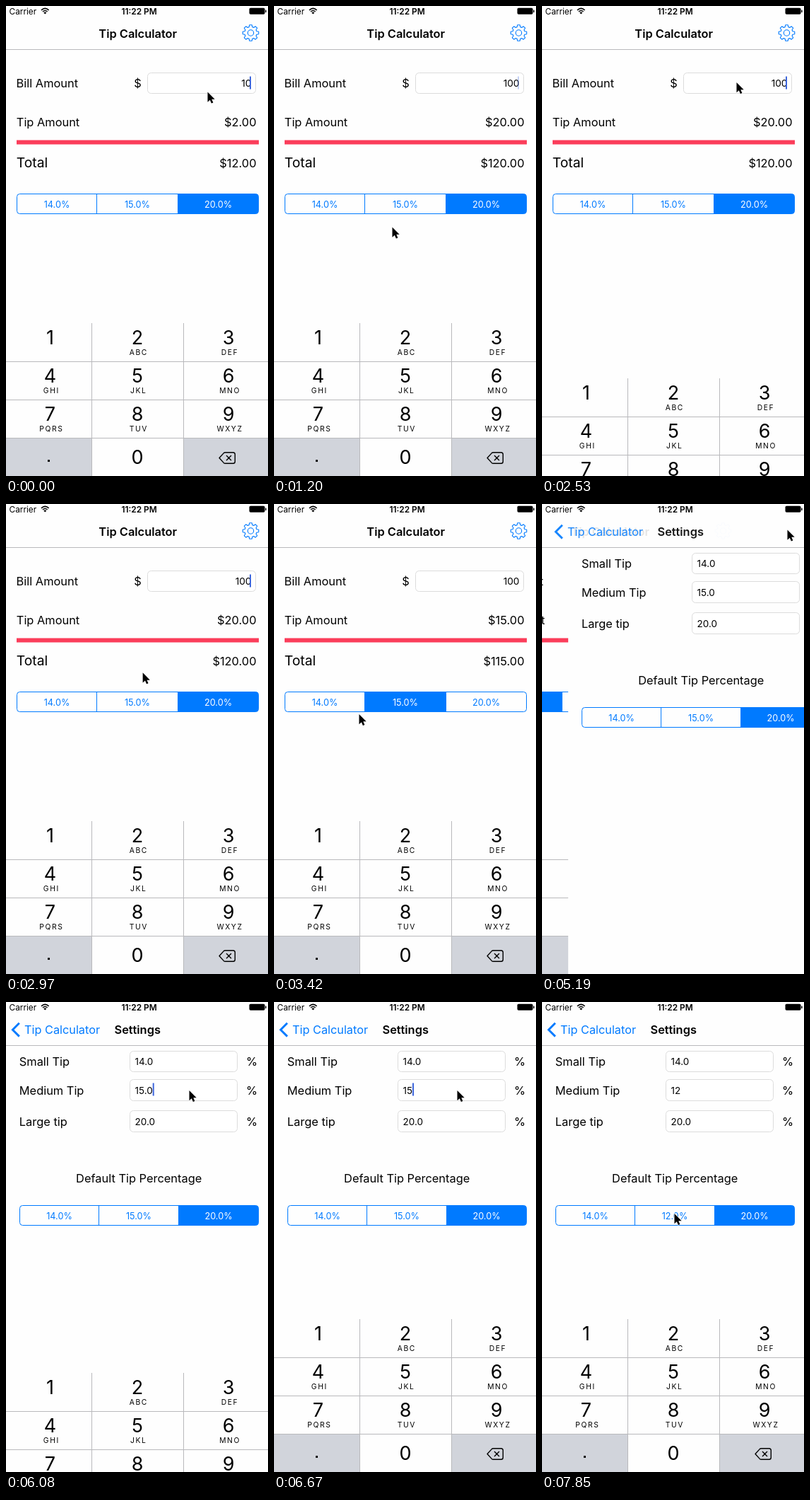
Write an HTML page that moves like this. It is 371 px wide and 664 px high and loops after 7.99 s.

```html
<!DOCTYPE html>
<html lang="en">
<head>
<meta charset="utf-8">
<title>Tip Calculator</title>
<style>
  html, body { margin: 0; width: 100%; height: 100%; overflow: hidden; background: #fefefe; }
  svg { display: block; width: 100%; height: 100%; }
  text { font-family: Inter, Roboto, sans-serif; font-size: 16.4px; fill: #000; white-space: pre; }
  .field { fill: #fff; stroke: #dcdcdc; }
  .blue { fill: #007aff; }
  .line { fill: none; stroke: #007aff; }
  .rule { stroke: #b9b9bc; }
</style>
</head>
<body>
<svg id="stage" viewBox="0 0 371 664"></svg>
<script>
const NS = 'http://www.w3.org/2000/svg';
const W = 371, LOOP = 7990, STEP = 148, KEYS_H = 216;
const stage = document.getElementById('stage');

function add(parent, tag, attrs = {}, content) {
  const node = document.createElementNS(NS, tag);
  for (const name in attrs) node.setAttribute(name, attrs[name]);
  if (content !== undefined) node.textContent = content;
  parent.appendChild(node);
  return node;
}
const group = parent => add(parent, 'g');
const rect = (parent, x, y, width, height, attrs) =>
  add(parent, 'rect', { x, y, width, height, ...attrs });
const path = (parent, d, attrs) => add(parent, 'path', { d, ...attrs });
const label = (parent, x, y, content, size = 16.4, anchor = 'start', attrs = {}) =>
  add(parent, 'text', { x, y, style: `font-size:${size}px`, 'text-anchor': anchor, ...attrs }, content);
const field = (parent, x, y, w, h) => rect(parent, x, y, w, h, { rx: 5, class: 'field' });
const caretIn = (parent, x, y) => rect(parent, x, y, 2, 18, { fill: '#3d66dc' });
const move = (node, x, y) => node.setAttribute('transform', `translate(${x} ${y})`);
const fade = (node, value) => node.setAttribute('opacity', value);

function segments(parent, y, edges) {
  const left = edges[0], right = edges[3], h = 28;
  const fill = path(parent, '', { class: 'blue' });
  rect(parent, left, y, right - left, h, { rx: 4, class: 'line' });
  path(parent, `M${edges[1]} ${y}v${h}M${edges[2]} ${y}v${h}`, { class: 'line' });
  const texts = [0, 1, 2].map(i =>
    label(parent, (edges[i] + edges[i + 1]) / 2, y + 19, '', 12.7, 'middle'));
  return (values, chosen) => {
    const a = edges[chosen], b = edges[chosen + 1];
    const l = chosen === 0 ? 4 : 0, r = chosen === 2 ? 4 : 0;
    fill.setAttribute('d', `M${a + l} ${y}H${b - r}q${r} 0 ${r} ${r}V${y + h - r}q0 ${r} ${-r} ${r}` +
      `H${a + l}q${-l} 0 ${-l} ${-l}V${y + l}q0 ${-l} ${l} ${-l}Z`);
    texts.forEach((text, i) => {
      text.textContent = values[i].toFixed(1) + '%';
      text.style.fill = i === chosen ? '#fff' : '#007aff';
    });
  };
}

function gearPath(cx, cy) {
  const points = [];
  for (let i = 0; i < 8; i++) {
    for (const [turn, r] of [[-.27, 8.7], [-.15, 11.4], [.15, 11.4], [.27, 8.7]]) {
      const a = i * Math.PI / 4 + turn;
      points.push((cx + r * Math.cos(a)).toFixed(2) + ' ' + (cy + r * Math.sin(a)).toFixed(2));
    }
  }
  return 'M' + points.join('L') + 'Z';
}

rect(stage, 0, 0, W, 664, { fill: '#fefefe' });

// Calculator page
const calc = group(stage);
label(calc, 14.6, 115, 'Bill Amount');
label(calc, 186.5, 115, '$', 16.4, 'middle');
field(calc, 200.5, 94.5, 153, 29);
const bill = label(calc, 347.5, 114, '', 13.7, 'end');
const billCaret = caretIn(calc, 345, 99.5);
label(calc, 14.8, 170, 'Tip Amount');
const tip = label(calc, 354.5, 170, '', 16.4, 'end');
rect(calc, 15, 189.5, 343, 6, { fill: '#fb3d5a' });
label(calc, 14.8, 227.5, 'Total', 19.3);
const total = label(calc, 354.5, 228, '', 16.4, 'end');
const setCalc = segments(calc, 265.5, [15.5, 128.5, 243.5, 357.5]);

// Settings page
const settings = group(stage);
rect(settings, 0, 62, W, 602, { fill: '#fefefe' });
const [, medium] = [['Small Tip', 90, 69.5, 29, '14.0'], ['Medium Tip', 131, 109.5, 30, ''],
  ['Large tip', 175, 153.5, 30, '20.0']].map(([name, base, top, h, value]) => {
  label(settings, 18.8, base, name);
  field(settings, 175.5, top, 152, h);
  label(settings, 348, base, '%', 16.4, 'middle');
  return label(settings, 182.5, base - 1.5, value, 13.5);
});
const mediumCaret = caretIn(settings, 208, 114.5);
label(settings, 188.2, 255, 'Default Tip Percentage', 16.4, 'middle');
const setDefault = segments(settings, 287.5, [19.5, 131.5, 244.5, 357.5]);

// Keypad
const keys = group(stage);
rect(keys, 0, 448, W, KEYS_H, { fill: '#fefefe' });
rect(keys, 0, 611, 121, 53, { fill: '#d1d4db' });
rect(keys, 252, 611, 119, 53, { fill: '#d1d4db' });
path(keys, 'M121.5 448V664M251.5 448V664M0 502.5H371M0 556.5H371M0 610.5H371', { class: 'rule' });
const columns = [62.5, 186, 315.2];
['', 'ABC', 'DEF', 'GHI', 'JKL', 'MNO', 'PQRS', 'TUV', 'WXYZ'].forEach((letters, i) => {
  const x = columns[i % 3], y = 478 + 54 * Math.floor(i / 3);
  label(keys, x, y, i + 1, 27, 'middle');
  label(keys, x + 1.8, y + 15.2, letters, 10.3, 'middle', { 'letter-spacing': 1.6 });
});
label(keys, 186, 647, '0', 27, 'middle');
rect(keys, 59, 641, 3, 3, { rx: .6 });
path(keys, 'M302 638.5L308.3 631.6Q309.2 630.7 310.5 630.7H321.5Q324.3 630.7 324.3 633.5V643.5' +
  'Q324.3 646.3 321.5 646.3H310.5Q309.2 646.3 308.3 645.4ZM312 635l7 7m0-7l-7 7',
  { fill: 'none', stroke: '#000', 'stroke-width': 1.4, 'stroke-linejoin': 'round' });

// Navigation and status bars
path(stage, 'M0 61.5H371', { class: 'rule' });
const calcNav = group(stage);
label(calcNav, 186.7, 45, 'Tip Calculator', 16.4, 'middle', { 'font-weight': 600 });
const gear = group(calcNav);
path(gear, gearPath(346.5, 38), { class: 'line', 'stroke-width': 1.1, 'stroke-linejoin': 'round' });
add(gear, 'circle', { cx: 346.5, cy: 38, r: 4.2, class: 'line', 'stroke-width': 1.1 });
const settingsNav = group(stage);
path(settingsNav, 'M18.8 29.8L9.4 39.2L18.8 48.6', { class: 'line', 'stroke-width': 2.9 });
label(settingsNav, 26, 45, 'Tip Calculator', 16.3, 'start', { class: 'blue' });
label(settingsNav, 186.2, 45, 'Settings', 16.4, 'middle', { 'font-weight': 600 });

label(stage, 4.6, 11.5, 'Carrier', 11.8);
label(stage, 188.6, 11.5, '11:22 PM', 11.9, 'middle', { 'font-weight': 600 });
path(stage, 'M50 5.8Q55.3 1 60.6 5.8M52 8Q55.3 5 58.6 8', { fill: 'none', stroke: '#000', 'stroke-width': 1.6 });
path(stage, 'M53.3 9.4Q55.3 7.8 57.3 9.4L55.3 11.6Z');
rect(stage, 344.5, 2.8, 22, 9, { rx: 1.8 });
rect(stage, 367.2, 5.4, 1.4, 3.8, { rx: .7 });

const pointer = path(stage, 'M0 0V14.2L3.3 11.2L5.4 16L7.9 15L5.8 10.3H10.2Z',
  { stroke: '#fff', 'stroke-width': 1.1, 'paint-order': 'stroke' });

// Tracks are rows of [step, ...values]
const mouseTrack = [[3, 285.5, 121.5], [6, 167.5, 312.5], [11, 167.5, 312.5], [15, 275.5, 108],
  [18, 275.5, 108], [21, 165, 284], [22, 160, 286], [23, 120.5, 297], [25, 75, 291], [26, 75, 291],
  [31, 347.5, 36.5], [35, 347.5, 36.5], [39, 259.5, 125], [48, 259.5, 125], [53, 187.5, 299]];
const keysTrack = [[9, 0], [10, 36], [11, 190], [12, KEYS_H], [16, KEYS_H], [17, 78], [18, 4], [19, 0],
  [35, 0], [36, KEYS_H], [40, KEYS_H], [41, 76], [42, 4], [43, 0]];
const pushTrack = [[33, 0], [34, .35], [35, .9], [36, 1]];
const typed = [[0, '15.0'], [44, '15.'], [45, '15'], [46, '1'], [47, '12']];
const chosenTrack = [[0, 2], [22, 1], [26, 0]];
const rates = [14, 15, 20];

function glide(track, k, ease = u => u) {
  const next = track.findIndex(row => row[0] > k);
  if (next === 0) return track[0].slice(1);
  if (next < 0) return track[track.length - 1].slice(1);
  const a = track[next - 1], b = track[next];
  const u = ease((k - a[0]) / (b[0] - a[0]));
  return a.slice(1).map((v, i) => v + (b[i + 1] - v) * u);
}
const held = (track, k) => track.filter(row => row[0] <= k).pop()[1];
const smooth = u => u * u * (3 - 2 * u);
const money = v => '$' + v.toFixed(2);

function billCaretAlpha(k) {
  if (k < 5) return 1;
  if (k < 8) return 0;
  if (k < 10) return .3;
  return k > 16 && (k - 17) % 7 < 4 ? 1 : 0;
}

function draw(t) {
  const k = Math.floor(t / STEP);
  const amount = k < 1 ? 10 : 100;
  const chosen = held(chosenTrack, k);
  const tipValue = amount * rates[chosen] / 100;
  const [push] = glide(pushTrack, k);

  bill.textContent = amount;
  tip.textContent = money(tipValue);
  total.textContent = money(amount + tipValue);
  setCalc(rates, chosen);
  fade(billCaret, billCaretAlpha(k));
  fade(gear, k >= 32 ? .2 : 1);

  const entry = held(typed, k);
  medium.textContent = entry;
  setDefault([14, parseFloat(entry), 20], 2);
  mediumCaret.setAttribute('x', 182.5 + medium.getComputedTextLength());
  fade(mediumCaret, k >= 40 && k < 51 ? 1 : 0);

  move(calc, -.3 * W * push, 0);
  move(settings, W * (1 - push), 0);
  move(calcNav, -100 * push, 0);
  move(settingsNav, 100 * (1 - push), 0);
  fade(calcNav, 1 - push);
  fade(settingsNav, push);
  move(keys, push < 1 ? -W * push : 0, glide(keysTrack, k)[0]);
  move(pointer, ...glide(mouseTrack, k, smooth));
}

const start = performance.now();
function tick() {
  draw((performance.now() - start) % LOOP);
  requestAnimationFrame(tick);
}
tick();
</script>
</body>
</html>
```
